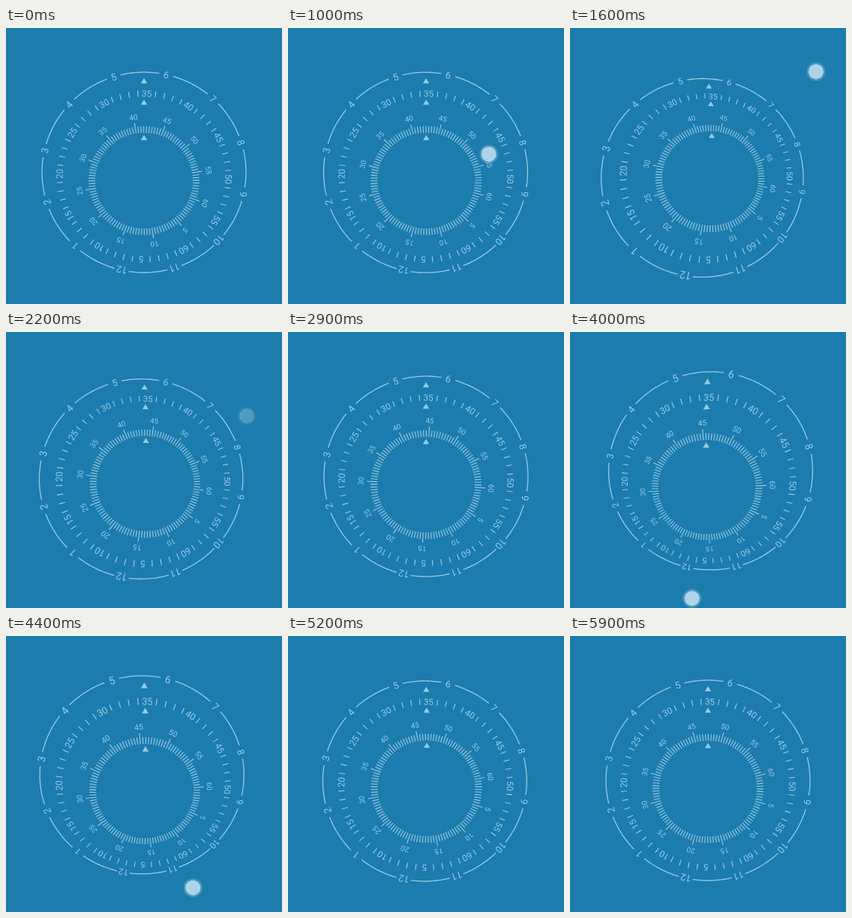
An HTML page with a canvas that plays this animation: 368 px wide and 368 px high, repeating every 6 s.

```html
<!DOCTYPE html>
<html lang="en">
<head>
<meta charset="utf-8">
<style>
  html, body { margin: 0; width: 100%; height: 100%; overflow: hidden; background: #1c7cad; }
  canvas { display: block; }
</style>
</head>
<body>
<canvas width="368" height="368"></canvas>
<script>
const ctx = document.querySelector("canvas").getContext("2d");
const LOOP = 6000, CENTER_X = 184, SQUEEZE = 0.982;
const VIEW_DISTANCE = 350, MAX_TILT = Math.PI / 18, REACH = 104, LAG = 130;
const START = { hour: 5, minute: 34, second: 41.55 };

// Bézier paths followed by the finger
const gestures = [
  { start: 990, end: 2110, path: [[266, 172], [327, 43], [346, 23], [321, 112]] },
  { start: 3000, end: 5000, path: [[138, 222], [-43, 324], [322, 504], [325, 135]] }
];

const clamp = (v, min, max) => Math.min(max, Math.max(min, v));

function fingerAt({ start, end, path: [a, b, c, d] }, t) {
  const p = clamp((t - start) / (end - start), 0, 1), q = 1 - p;
  return [0, 1].map(i => q ** 3 * a[i] + 3 * q * q * p * b[i] + 3 * q * p * p * c[i] + p ** 3 * d[i]);
}

// The tilt trails the finger and relaxes after release.
function tiltAt(t) {
  const gesture = gestures.findLast(g => t >= g.start);
  if (!gesture) return [0, 0];
  const { start, end } = gesture;
  const amount = (1 - Math.exp((start - t) / LAG)) * Math.exp(Math.min(0, end - t) / LAG);
  const [x, y] = fingerAt(gesture, t - LAG);
  return [CENTER_X - x, 200 - y].map(v => clamp(v / REACH, -1, 1) * MAX_TILT * amount);
}

function makeDial(cy, depth, [tiltX, tiltY], rotation) {
  const sx = Math.sin(tiltX), sy = Math.sin(tiltY);

  function project(u, v) {
    v *= SQUEEZE;
    const k = VIEW_DISTANCE / (VIEW_DISTANCE - u * sx - v * sy);
    return [CENTER_X + (u * Math.cos(tiltX) - depth * sx) * k, cy + (v * Math.cos(tiltY) - depth * sy) * k];
  }

  // Local axes at a point of the dial: x along the rim, y towards the centre.
  function place(degrees, radius) {
    const angle = degrees * Math.PI / 180, c = Math.cos(angle), s = Math.sin(angle);
    const u = radius * s, v = -radius * c;
    const [x, y] = project(u, v), [x1, y1] = project(u + c, v + s), [x2, y2] = project(u - s, v + c);
    ctx.setTransform(x1 - x, y1 - y, x2 - x, y2 - y, x, y);
  }

  return {
    tick(degrees, inner, outer) {
      place(degrees + rotation, inner);
      ctx.lineWidth = 1.15;
      ctx.beginPath();
      ctx.moveTo(0, 0);
      ctx.lineTo(0, inner - outer);
      ctx.stroke();
    },
    label(value, degrees, radius, size) {
      place(degrees + rotation, radius);
      ctx.font = `${size}px Roboto, sans-serif`;
      ctx.fillText(value, 0, size * 0.355);
    },
    arc(from, to, radius) {
      ctx.resetTransform();
      ctx.lineWidth = 1.3;
      ctx.beginPath();
      for (let d = from; d <= to; d++) {
        const angle = (d + rotation) * Math.PI / 180;
        ctx.lineTo(...project(radius * Math.sin(angle), -radius * Math.cos(angle)));
      }
      ctx.stroke();
    },
    pointer(radius) {
      place(0, radius);
      ctx.beginPath();
      ctx.moveTo(0, -3.5);
      ctx.lineTo(4.2, 3.5);
      ctx.lineTo(-4.2, 3.5);
      ctx.fill();
    }
  };
}

function drawClock(t) {
  const second = START.second + t / 1000;
  const minute = START.minute + second / 60;
  const hour = START.hour + minute / 60;
  const tilt = tiltAt(t);
  const hours = makeDial(192.5, 8, tilt, -hour * 30);
  const minutes = makeDial(198, 23, tilt, -minute * 6);
  const seconds = makeDial(203.5, 30, tilt, -second * 6);

  ctx.strokeStyle = ctx.fillStyle = "#93cbe8";
  ctx.textAlign = "center";
  hours.pointer(124.5);
  minutes.pointer(101);
  seconds.pointer(58.5);

  for (let i = 1; i <= 12; i++) {
    hours.label(i, i * 30, 135.5, 13);
    hours.arc(i * 30 + 4, i * 30 + 26, 136);
    minutes.label(i * 5, i * 30, 112.5, 12);
    seconds.label(i * 5, i * 30, 87, 10);
  }
  for (let i = 0; i < 60; i++) if (i % 5) minutes.tick(i * 6, 108.5, 116.5);
  for (let i = 0; i < 120; i++) seconds.tick(i * 3, 65, i % 10 ? 74 : 79);
}

function drawFinger(t) {
  const gesture = gestures.find(g => t >= g.start && t < g.end + LAG);
  if (!gesture) return;
  const opacity = Math.min(1, 1 - (t - gesture.end) / LAG);
  ctx.resetTransform();
  ctx.fillStyle = "#aed3e9";
  for (const [radius, alpha] of [[12.5, 0.3], [10, 1]]) {
    ctx.globalAlpha = alpha * opacity;
    ctx.beginPath();
    ctx.arc(...fingerAt(gesture, t), radius, 0, 2 * Math.PI);
    ctx.fill();
  }
  ctx.globalAlpha = 1;
}

function frame() {
  const t = performance.now() % LOOP;
  ctx.resetTransform();
  ctx.clearRect(0, 0, 368, 368);
  drawClock(t);
  drawFinger(t);
  requestAnimationFrame(frame);
}
frame();
</script>
</body>
</html>
```
